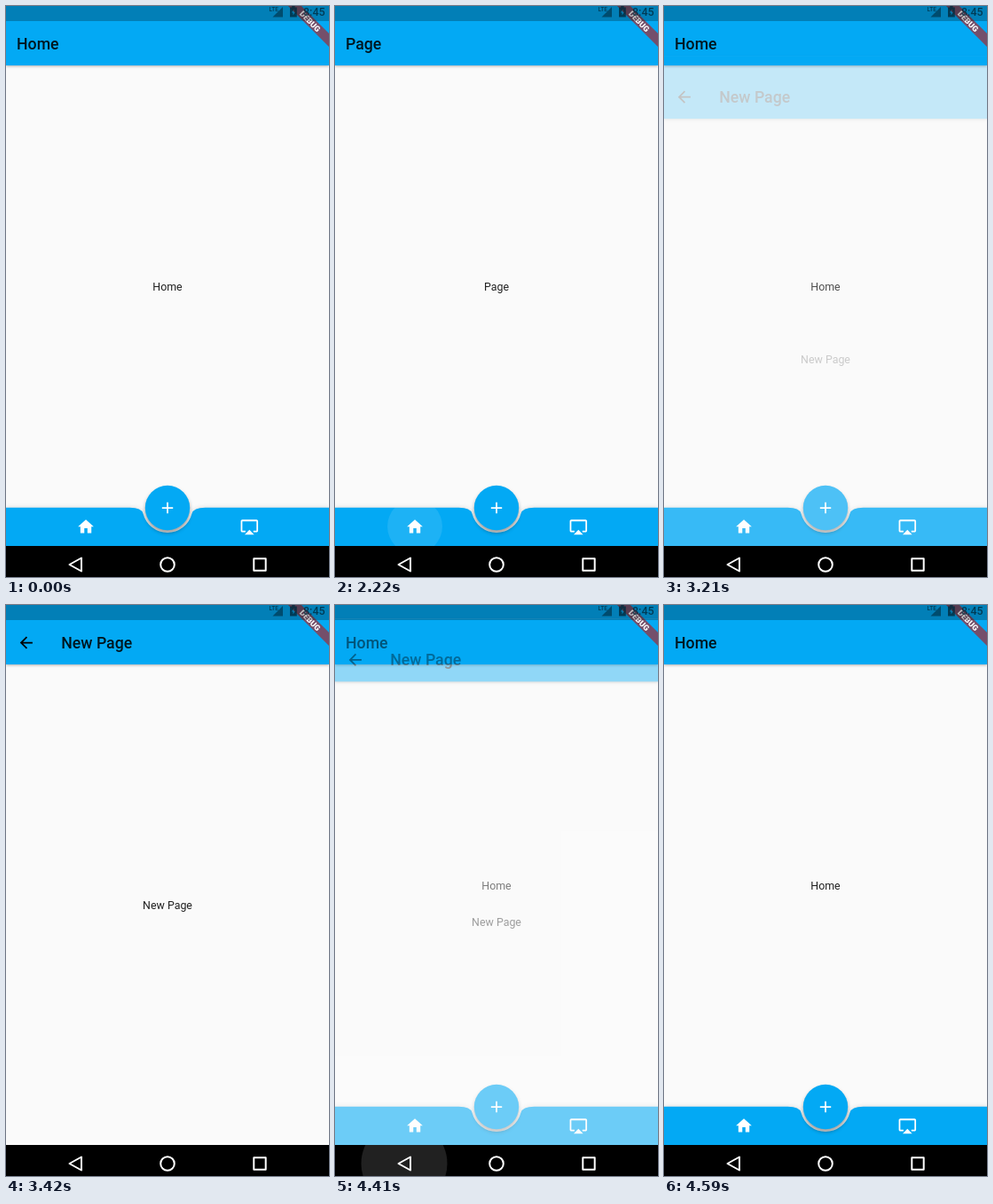
Animation, 364 px wide and 644 px high, one loop 5.22 s. Source, as an HTML page:

```html
<!DOCTYPE html>
<html lang="en">
<head>
<meta charset="utf-8">
<style>
html, body { margin: 0; width: 100%; height: 100%; overflow: hidden; background: #fafafa; }
svg { display: block; width: 364px; height: 644px; font-family: Roboto, "Noto Sans", sans-serif; }
.title { font-size: 17.7px; font-weight: 500; fill: #000; fill-opacity: .87; }
.body { font-size: 12.4px; text-anchor: middle; fill: #000; fill-opacity: .87; }
.blue { fill: #03a9f4; }
.bar { filter: drop-shadow(0 1.5px 1.5px rgba(0, 0, 0, .3)); }
.dock { filter: drop-shadow(0 -1px 2px rgba(0, 0, 0, .1)); }
.fab { filter: drop-shadow(0 3px 2px rgba(0, 0, 0, .36)); }
.white { fill: #fff; }
.keys { fill: none; stroke: #fff; stroke-width: 2; stroke-linejoin: round; }
</style>
</head>
<body>
<svg viewBox="0 0 364 644">
  <defs>
    <clipPath id="view"><rect width="364" height="609"/></clipPath>
    <clipPath id="dockClip"><use href="#dock"/></clipPath>
    <clipPath id="keysClip"><rect y="609" width="364" height="35"/></clipPath>
  </defs>

  <g clip-path="url(#view)">
    <!-- Tab screen -->
    <rect width="364" height="609" fill="#fafafa"/>
    <rect class="blue bar" y="-4" width="364" height="71"/>
    <text class="title" id="title" x="12" y="49">Home</text>
    <text class="body" id="label" x="182" y="321">Home</text>
    <g class="dock">
      <path class="blue" id="dock" d="M0 565.8H139.5Q152.8 565.8 154.6 572.7A28.3 28.3 0 0 0 209.4 572.7Q211.2 565.8 224.5 565.8H364V612H0Z"/>
    </g>
    <g class="white" clip-path="url(#dockClip)">
      <circle id="homeInk" cx="90" cy="587" r="31"/>
      <circle id="pageInk" cx="274.3" cy="587" r="31"/>
    </g>
    <circle class="blue fab" cx="182" cy="566" r="25.2"/>
    <circle class="white" id="fabInk" cx="182" cy="566" r="25.2"/>
    <g class="white">
      <path transform="translate(79.4 576.7) scale(.885)" d="M10 20v-6h4v6h5v-8h3L12 3 2 12h3v8z"/>
      <path transform="translate(263.7 576.7) scale(.885)" d="M6 22h12l-6-6zM21 3H3c-1.1 0-2 .9-2 2v12c0 1.1.9 2 2 2h4v-2H3V5h18v12h-4v2h4c1.1 0 2-.9 2-2V5c0-1.1-.9-2-2-2z"/>
      <path transform="translate(171.4 555.4) scale(.885)" d="M19 13h-6v6h-2v-6H5v-2h6V5h2v6h6z"/>
    </g>

    <!-- Pushed screen -->
    <g id="pushed">
      <rect y="-4" width="364" height="613" fill="#fafafa"/>
      <rect class="blue bar" y="-4" width="364" height="71"/>
      <path transform="translate(12.2 31.9) scale(.885)" d="M20 11H7.83l5.59-5.59L12 4l-8 8 8 8 1.41-1.41L7.83 13H20z"/>
      <text class="title" x="62.3" y="49">New Page</text>
      <text class="body" x="182" y="342.5">New Page</text>
    </g>

    <!-- Debug ribbon and status bar -->
    <g transform="translate(364 -4) rotate(45)">
      <rect x="-36" y="24.8" width="72" height="10.6" fill="#b71c1c" fill-opacity=".63"/>
      <text class="white" y="33.3" font-size="9" font-weight="900" text-anchor="middle">DEBUG</text>
    </g>
    <rect width="364" height="17" fill-opacity=".25"/>
    <g fill="#002a3d" fill-opacity=".8">
      <path d="M312 1V12.5H300.5Z" fill-opacity=".6"/>
      <text x="296.5" y="5.5" font-size="6.5" font-weight="500">LTE</text>
      <path d="M320 1.5h2.2V0h3.4v1.5h2.2V12.5H320ZM324.6 3.5l-2.6 4h1.5v3l2.6-4h-1.5Z" fill-rule="evenodd"/>
      <text x="359.5" y="11.3" font-size="12.4" font-weight="500" text-anchor="end">8:45</text>
    </g>
  </g>

  <!-- System keys -->
  <rect y="609" width="364" height="35"/>
  <circle class="white" id="keyInk" cx="78" cy="630" clip-path="url(#keysClip)"/>
  <g class="keys">
    <path d="M71.5 630L85 622.5V637.5Z"/>
    <circle cx="182" cy="630" r="7.8"/>
    <rect x="279.3" y="623.3" width="13.4" height="13.4"/>
  </g>
</svg>
<script>
const LOOP = 5220;
const el = id => document.getElementById(id);
const clamp = v => Math.min(1, Math.max(0, v));
const span = (t, from, to) => clamp((t - from) / (to - from));

// Cubic Bézier easing, solved by bisection
function bezier(x1, y1, x2, y2) {
  const at = (a, b, s) => 3 * (1 - s) ** 2 * s * a + 3 * (1 - s) * s * s * b + s ** 3;
  return x => {
    let lo = 0, hi = 1;
    for (let i = 0; i < 24; i++) {
      const mid = (lo + hi) / 2;
      if (at(x1, x2, mid) < x) lo = mid; else hi = mid;
    }
    return at(y1, y2, lo);
  };
}
const slide = bezier(.4, 0, .2, 1);
const easeIn = bezier(.42, 0, 1, 1);

const fade = (id, alpha) => el(id).setAttribute("opacity", alpha);

function draw(t) {
  const name = t >= 1620 && t < 2250 ? "Page" : "Home";
  for (const id of ["title", "label"]) el(id).textContent = name;

  fade("pageInk", t < 1620 ? 0 : t < 1660 ? .02 + .06 * span(t, 1620, 1660) : .08 * (1 - span(t, 1660, 1800)));
  fade("homeInk", t < 2220 ? 0 : .1 * (1 - span(t, 2225, 2480)));
  fade("fabInk", t < 3110 ? 0 : .16 * (1 - span(t, 3150, 3330)));

  const shown = span(t, 3092, 3392) - span(t, 4290, 4590);
  fade("pushed", easeIn(shown));
  el("pushed").setAttribute("transform", `translate(0 ${153 * (1 - slide(shown))})`);

  const press = span(t, 4160, 4390);
  el("keyInk").setAttribute("r", 48.5 * (1 - (1 - press) ** 3));
  fade("keyInk", .13 * span(t, 4160, 4220) * (1 - span(t, 4415, 4585)));
}

const start = performance.now();
function tick() {
  draw((performance.now() - start) % LOOP);
  requestAnimationFrame(tick);
}
tick();
</script>
</body>
</html>
```
